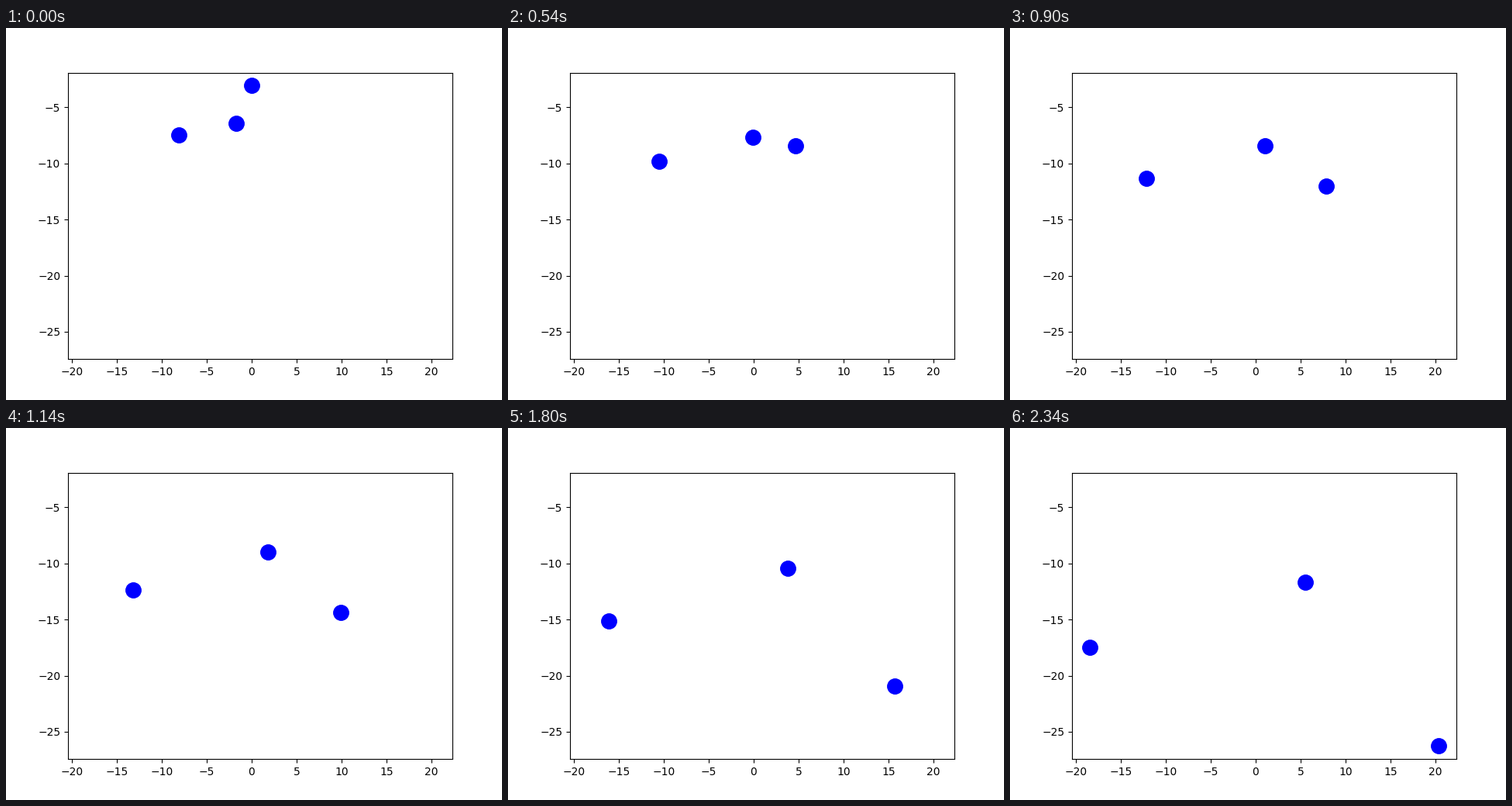
These frames come from a looping animation (640 by 480 pixels, 2400 ms). A matplotlib script:

```python
import numpy as np
import matplotlib.pyplot as plt
from matplotlib.animation import FuncAnimation

FRAMES = 40
INTERVAL = 60  # ms

# Start positions and velocities per frame, in axis units.
START = np.array([[-8.1287, -7.4793], [-1.75, -6.4302], [-0.0034, -3.0663]])
VELOCITY = np.array([[-0.26539, -0.25552], [0.18621, -0.13356], [0.52297, -0.59496]])

fig, ax = plt.subplots(figsize=(6.4, 4.8), dpi=100)
ax.set_xlim(-20.422, 22.336)
ax.set_ylim(-27.431, -1.906)
dots, = ax.plot([], [], "bo", markersize=14)


def update(frame):
    x, y = (START + VELOCITY * frame).T
    dots.set_data(x, y)
    return dots,


anim = FuncAnimation(fig, update, frames=FRAMES, interval=INTERVAL,
                     repeat=True, repeat_delay=0, blit=False)
plt.show()
```
